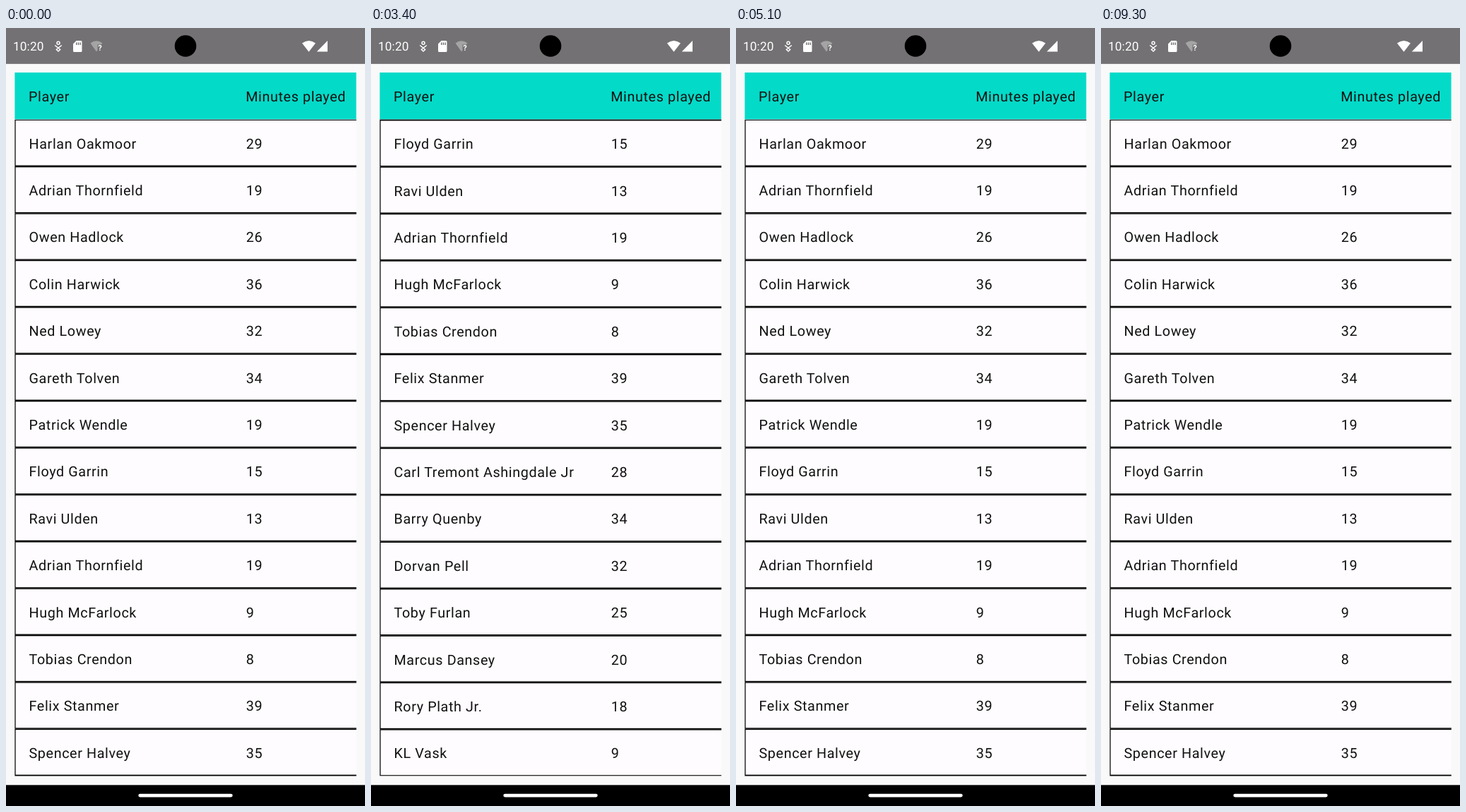
Animation, 508 px wide and 1102 px high, one loop 9.5 s. Source, as an HTML page with a canvas:

```html
<!DOCTYPE html>
<html lang="en">
<head>
<meta charset="utf-8">
<title>Player table</title>
<style>
html, body { margin: 0; width: 508px; height: 1102px; overflow: hidden; }
canvas { display: block; }
</style>
</head>
<body>
<canvas id="stage" width="508" height="1102"></canvas>
<script>
const ctx = document.getElementById('stage').getContext('2d');
const LOOP = 9500, STEP = 100;
const LEFT = 12.23, RIGHT = 495.77, TOP = 63.1, BODY = 129.5, BOTTOM = 1059.6;
const ROW = 66.4, LINE = 1.41, TABLE_RIGHT = 737;
const MAX_X = 241, MAX_Y = 464.3, BASELINE = 41.1;
const COLUMNS = [32, 339.2, 521.2, 621.2];
const HEADS = ['Player', 'Minutes played', 'Points', 'Rebounds'];
const ROWS = `Harlan Oakmoor,29,25,4
Adrian Thornfield,19,9,2
Owen Hadlock,26,16,4
Colin Harwick,36,17,5
Ned Lowey,32,16,4
Gareth Tolven,34,11,8
Patrick Wendle,19,12,4
Floyd Garrin,15,9,2
Ravi Ulden,13,5,3
Adrian Thornfield,19,9,2
Hugh McFarlock,9,0,0
Tobias Crendon,8,0,1
Felix Stanmer,39,23,6
Spencer Halvey,35,24,9
Carl Tremont Ashingdale Jr,28
Barry Quenby,34
Dorvan Pell,32
Toby Furlan,25
Marcus Dansey,20
Rory Plath Jr.,18
KL Vask,9`.split('\n').map(row => row.split(','));

// Progress from 0 to 1 between two times, eased at both ends
function ease(t, from, to) {
  const u = Math.min(1, Math.max(0, (t - from) / (to - from)));
  return u * u * (3 - 2 * u);
}

function box(color, x, y, w, h) {
  ctx.fillStyle = color;
  ctx.fillRect(x, y, w, h);
}

function disc(color, x, y, r) {
  ctx.fillStyle = color;
  ctx.beginPath();
  ctx.arc(x, y, r, 0, 2 * Math.PI);
  ctx.fill();
}

function shape(path, color = '#fff') {
  ctx.fillStyle = color;
  ctx.fill(new Path2D(path));
}

function text(str, x, y, font = '19.76px', spacing = 0.617, color = '#111') {
  ctx.font = `${font} Roboto, sans-serif`;
  ctx.letterSpacing = spacing + 'px';
  ctx.textRendering = 'geometricPrecision';
  ctx.fillStyle = color;
  ctx.fillText(str, x, y);
}

function clipped(top, bottom, draw) {
  ctx.save();
  ctx.beginPath();
  ctx.rect(LEFT, top, RIGHT - LEFT, bottom - top);
  ctx.clip();
  draw();
  ctx.restore();
}

function drawTable(sx, sy) {
  clipped(BODY, BOTTOM, () => {
    box('#fefcfe', LEFT, BODY, RIGHT - LEFT, BOTTOM - BODY);
    ctx.strokeStyle = '#000';
    ctx.lineWidth = LINE;
    ROWS.forEach((cells, i) => {
      const y = BODY + i * ROW - sy;
      ctx.strokeRect(LEFT + LINE / 2 - sx, y + LINE / 2, TABLE_RIGHT - LEFT - LINE, ROW - LINE);
      cells.forEach((cell, c) => text(cell, COLUMNS[c] + 0.5 - sx, y + BASELINE));
    });
  });
  clipped(TOP, BODY, () => {
    box('#04dac8', LEFT, TOP, RIGHT - LEFT, BODY - TOP);
    HEADS.forEach((head, c) => text(head, COLUMNS[c] - sx, TOP + BASELINE));
  });
}

function drawBars() {
  box('#737173', 0, 0, 508, 50.86);
  text('10:20', 10, 32, '17.3px', 0.1, '#fff');
  disc('#000', 254, 25.5, 15.3);

  // Status icons
  ctx.strokeStyle = '#fff';
  ctx.lineWidth = 1.5;
  ctx.stroke(new Path2D('M76 21.2a2 2 0 1 1-4 0a2 2 0 1 1 4 0M69.2 24.5L74 28.3L78.8 24.5M74 28.3l-2.6 2.2L74 33l2.6-2.5z'));
  shape('M99.5 18H106a1.5 1.5 0 0 1 1.5 1.5V32.5a1.5 1.5 0 0 1-1.5 1.5H96.5a1.5 1.5 0 0 1-1.5-1.5V22.5z');
  for (const x of [99, 101.7, 104.4]) box('#737173', x, 20.5, 1.4, 3.5);
  shape('M119.5 21.5Q128 15 136.5 21.5L134.5 23.5H129.5V31.5L128 33.5z', '#a5a4a5');
  text('?', 130.3, 32, 'bold 11px', 0, '#fff');
  shape('M419 21.5Q428.5 14.5 438 21.5L428.5 33.7z');
  shape('M455 18V33.5H439.8z');

  box('#000', 0, 1072.3, 508, 29.7);
  ctx.fillStyle = '#fff';
  ctx.beginPath();
  ctx.roundRect(187.3, 1084.65, 133.4, 4.9, 2.45);
  ctx.fill();
}

function drawTouch(t, sx, sy) {
  const touches = [
    [2300, 3300, 278, 758 - sy],
    [4200, 4900, 313.5, 335 + MAX_Y - sy],
    [6800, 7300, 490 - sx, 709],
    [7400, 7900, 368 + MAX_X - sx, 709]
  ];
  const touch = touches.find(([from, to]) => t >= from && t < to);
  if (!touch) return;
  disc('rgba(255,255,255,.45)', touch[2], touch[3], 10.7);
  ctx.strokeStyle = '#a8c2e0';
  ctx.lineWidth = 1.3;
  ctx.stroke();
}

function frame(now) {
  const t = Math.floor(now % LOOP / STEP) * STEP;
  const sx = MAX_X * (ease(t, 6850, 7300) - ease(t, 7400, 8184));
  const sy = MAX_Y * (ease(t, 2400, 3260) - ease(t, 4300, 4900));
  box('#f9f9fa', 0, 0, 508, 1102);
  drawTable(sx, sy);
  drawBars();
  drawTouch(t, sx, sy);
  requestAnimationFrame(frame);
}
requestAnimationFrame(frame);
</script>
</body>
</html>
```
